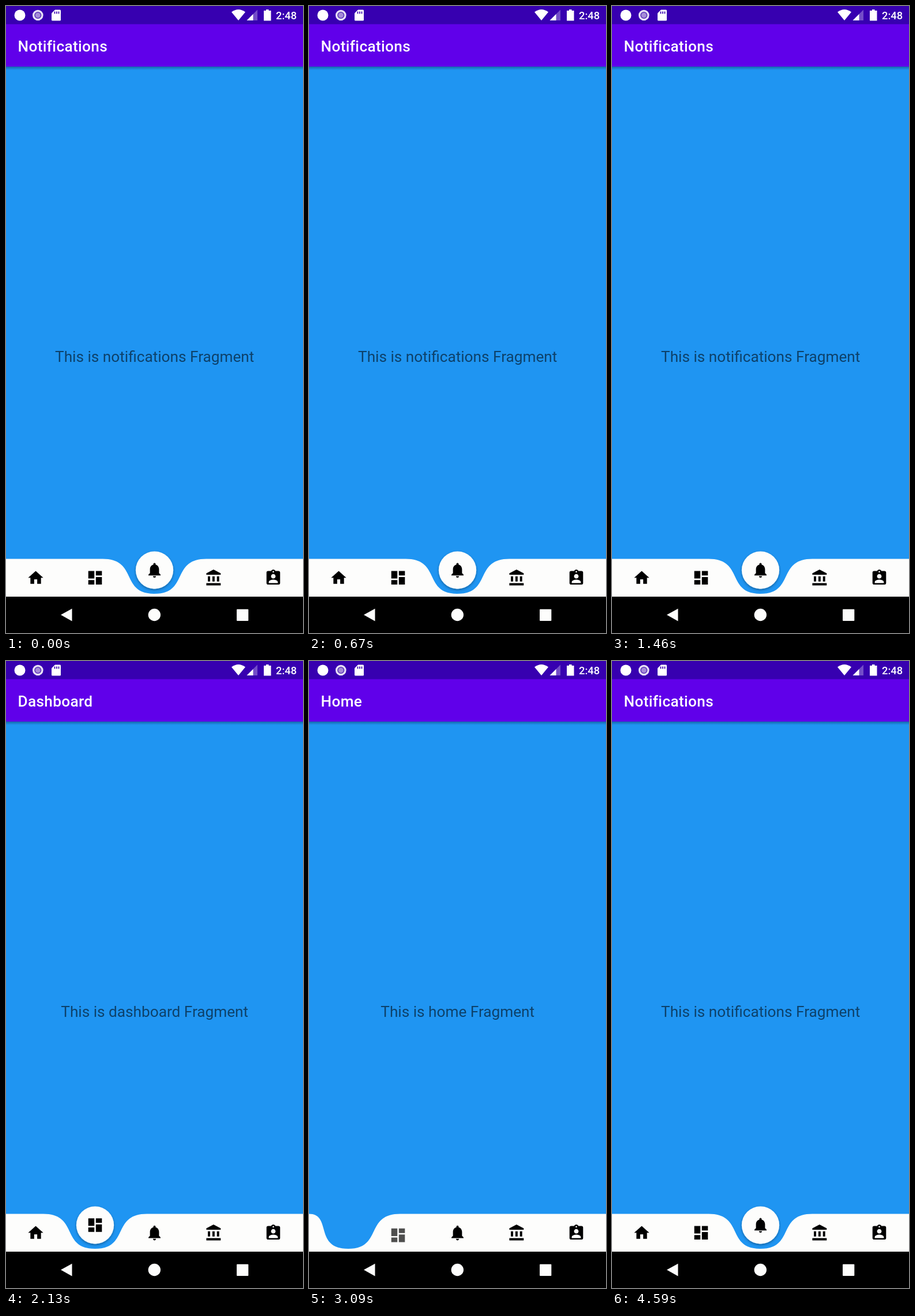
Recreate the animation shown at these times as an HTML page. Size 515x1087 px, loop 4750 ms.

```html
<!DOCTYPE html>
<html lang="en">
<head>
<meta charset="utf-8">
<title>Curved bottom navigation</title>
<style>
  html, body { margin: 0; width: 100%; height: 100%; overflow: hidden; background: #000; }
  svg { display: block; width: 100%; height: 100%; }
  text { font-family: Roboto, "Open Sans", sans-serif; }
  .title { font-size: 26.2px; font-weight: 500; letter-spacing: .0125em; fill: #fff; }
  .label { font-size: 26.2px; text-anchor: middle; fill: #000; fill-opacity: .56; }
  .clock { font-size: 18.3px; font-weight: 500; fill: #fff; }
</style>
</head>
<body>
<svg viewBox="0 0 515 1087" preserveAspectRatio="none">
  <defs>
    <linearGradient id="shade" x1="0" y1="0" x2="0" y2="1">
      <stop offset="0" stop-color="#124f86" stop-opacity=".65"/>
      <stop offset="1" stop-color="#124f86" stop-opacity="0"/>
    </linearGradient>
    <filter id="lift" x="-30%" y="-30%" width="160%" height="170%">
      <feDropShadow dx="0" dy="2" stdDeviation="2.2" flood-color="#000" flood-opacity=".35"/>
    </filter>
  </defs>

  <rect width="515" height="1087" fill="#1f95f2"/>
  <g id="labels"></g>

  <rect y="105" width="515" height="6" fill="url(#shade)"/>
  <rect y="31" width="515" height="74" fill="#6000ea"/>
  <rect width="515" height="31.5" fill="#3700b0"/>
  <text class="title" id="title" x="20.5" y="79"></text>

  <g fill="#fff">
    <circle cx="24" cy="16" r="9.5"/>
    <circle cx="55.3" cy="16" r="9.3" fill="#e9e2f6"/>
    <circle cx="55.3" cy="16" r="5.3" fill="#a58bd8" stroke="#5a35b8" stroke-width="1.6"/>
    <path d="M85 6.5H93.500Q95 6.500 95 8V24Q95 25.500 93.500 25.500H80.500Q79 25.500 79 24V12.500Z"/>
    <path d="M84.500 9.500v4M88 9.500v4M91.500 9.500v4" stroke="#3700b0" stroke-width="1.7"/>
    <path d="M391 10.500Q403 1.500 415 10.500L403 25Z"/>
    <path d="M436 6.500V25H417.500Z" fill-opacity=".3"/>
    <path d="M428.500 14V25H417.500Z"/>
    <path d="M451 6h4.500v2H459.500V25.500H447V8H451Z"/>
  </g>
  <text class="clock" x="468" y="23">2:48</text>

  <path id="bar" fill="#fdfdfc"/>
  <g id="icons"></g>
  <g id="fab">
    <circle r="32.600" fill="#fdfdfc" filter="url(#lift)"/>
    <path id="fabIcon" transform="scale(1.31) translate(-12 -12)"/>
  </g>

  <rect y="1024" width="515" height="63" fill="#000"/>
  <g fill="#fdfdfc">
    <path d="M95 1055.500L114.500 1044.800V1066.500Z"/>
    <circle cx="257.300" cy="1055.500" r="10.700"/>
    <rect x="400" y="1045.700" width="20.300" height="20.300" rx="1"/>
  </g>
</svg>
<script>
  const LOOP = 4750, MOVE = 300, FADE = 220;
  const CELL = 103, TOP = 958.5, DIP = 1019, BOTTOM = 1024, ICON_Y = 991.3;
  const FAB_Y = 978, FAB_HIDDEN = 1064, ICON_DROP = 14;

  const pages = ['Home', 'Dashboard', 'Notifications'];
  const moves = [
    { at: 1620, from: 2, to: 1 },
    { at: 2870, from: 1, to: 0 },
    { at: 4120, from: 0, to: 2 }
  ];
  const iconPaths = [
    'M10 20v-6h4v6h5v-8h3L12 3 2 12h3v8z',
    'M3 13h8V3H3v10zm0 8h8v-6H3v6zm10 0h8V11h-8v10zm0-18v6h8V3h-8z',
    'M12 22c1.1 0 2-.9 2-2h-4c0 1.1.89 2 2 2zm6-6v-5c0-3.07-1.64-5.64-4.5-6.32V4c0-.83-.67-1.5-1.5-1.5s-1.5.67-1.5 1.5v.68C7.63 5.36 6 7.92 6 11v5l-2 2v1h16v-1l-2-2z',
    'M4 10v7h3v-7zm6 0v7h3v-7zM2 22h19v-3H2zm14-12v7h3v-7zm-4.500-9L2 6v2h19V6z',
    'M19 3h-4.180C14.400 1.840 13.300 1 12 1s-2.400.84-2.820 2H5c-1.100 0-2 .9-2 2v14c0 1.100.9 2 2 2h14c1.100 0 2-.9 2-2V5c0-1.100-.9-2-2-2zm-7 0c.55 0 1 .45 1 1s-.45 1-1 1-1-.45-1-1 .45-1 1-1zm0 4c1.660 0 3 1.340 3 3s-1.340 3-3 3-3-1.340-3-3 1.340-3 3-3zm6 12H6v-1.400c0-2 4-3.100 6-3.100s6 1.100 6 3.100z'
  ];

  const $ = id => document.getElementById(id);
  const add = (parent, name, attrs) => {
    const node = document.createElementNS('http://www.w3.org/2000/svg', name);
    for (const key in attrs) node.setAttribute(key, attrs[key]);
    return parent.appendChild(node);
  };
  const clamp = v => Math.min(1, Math.max(0, v));
  const mix = (a, b, t) => a + (b - a) * t;
  const ease = t => .5 - .5 * Math.cos(Math.PI * clamp(t));
  const phase = (t, start, end) => ease((t - start) / (end - start));
  const cellX = i => CELL * (i + .5);

  const icons = iconPaths.map(d => add($('icons'), 'path', { d }));
  const labels = pages.map(page => {
    const label = add($('labels'), 'text', { class: 'label', x: 257.7, y: 617 });
    label.textContent = `This is ${page.toLowerCase()} Fragment`;
    return label;
  });

  // The dip is two mirrored cubics; its left side stays inside the stage.
  function barPath(x) {
    const left = dx => Math.max(0, x - dx);
    return `M0 ${TOP}H${left(90)}C${left(28)} ${TOP} ${left(60)} ${DIP} ${x} ${DIP}` +
      `C${x + 60} ${DIP} ${x + 28} ${TOP} ${x + 90} ${TOP}H515V${BOTTOM}H0Z`;
  }

  function iconVisibility(i, from, to, t) {
    if (i === to) return 1 - phase(t, 0, .4);
    if (i === from) return phase(t, .3, 1);
    const between = (i - from) * (i - to) < 0;
    return between ? 1 - phase(t, .15, .45) + phase(t, .55, .9) : 1;
  }

  function render(time) {
    const { at, from, to } = moves.filter(m => m.at <= time).pop() || { at: -LOOP, from: 0, to: 2 };
    const t = clamp((time - at) / MOVE);
    const x = mix(cellX(from), cellX(to), ease(t));

    $('title').textContent = pages[to];
    const fade = clamp((time - at) / FADE);
    labels.forEach((label, i) =>
      label.setAttribute('opacity', i === to ? fade : i === from ? 1 - fade : 0));

    $('bar').setAttribute('d', barPath(x));
    icons.forEach((icon, i) => {
      const seen = iconVisibility(i, from, to, t);
      const y = ICON_Y + ICON_DROP * (1 - seen);
      icon.setAttribute('opacity', seen);
      icon.setAttribute('transform', `translate(${cellX(i)} ${y}) scale(1.31) translate(-12 -12)`);
    });

    const hiding = t < .5;
    const raised = hiding ? 1 - phase(t, 0, .42) : phase(t, .72, 1);
    $('fab').setAttribute('transform', `translate(${x} ${mix(FAB_HIDDEN, FAB_Y, raised)})`);
    $('fabIcon').setAttribute('d', iconPaths[hiding ? from : to]);
  }

  const start = performance.now();
  function tick() {
    render((performance.now() - start) % LOOP);
    requestAnimationFrame(tick);
  }
  tick();
</script>
</body>
</html>
```
